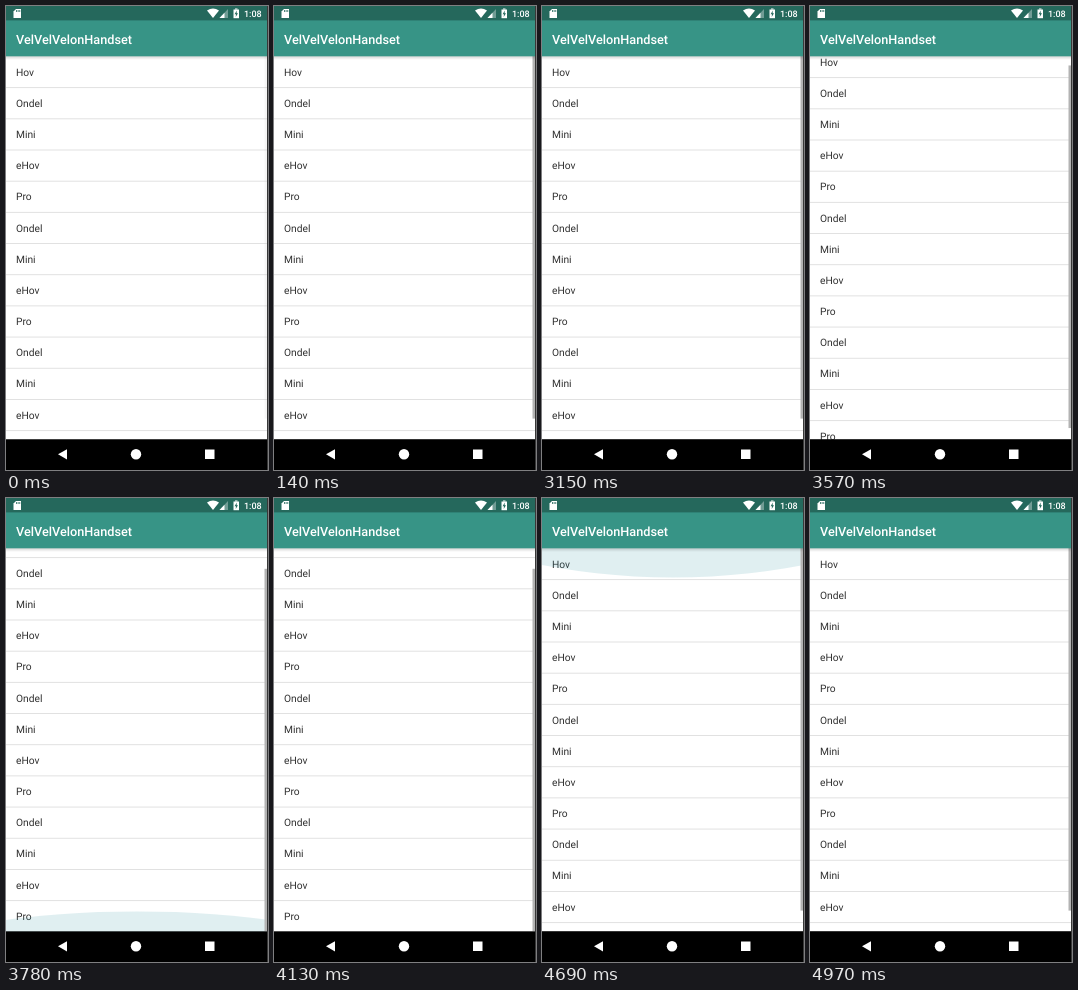
An HTML page with a canvas for the animation above (5.88 s loop, 262x464 px).

```html
<!DOCTYPE html>
<html lang="en">
<head>
<meta charset="utf-8">
<title>List overscroll</title>
<style>
  html, body { margin: 0; width: 100%; height: 100%; overflow: hidden; background: #fff; }
  canvas { display: block; width: 262px; height: 464px; }
</style>
</head>
<body>
<canvas id="stage" width="262" height="464"></canvas>
<script>
const ctx = document.getElementById('stage').getContext('2d');
ctx.textRendering = 'geometricPrecision';

const W = 262, H = 464, TOP = 50, BOTTOM = 433.4, VIEW = BOTTOM - TOP;
const LOOP = 5880, STEP = 70;
const ROW = 31.18, MAX_SCROLL = 22;
const FONT = 'Roboto, "Open Sans", sans-serif';
const CYCLE = ['Ondel', 'Mini', 'eHov', 'Pro'];
const ROWS = ['Hov', ...Array.from({ length: 12 }, (_, i) => CYCLE[i % 4])];

// Key points: [time in ms, value]
const SCROLL = [[3500, 0], [3570, 10], [3640, MAX_SCROLL], [4410, MAX_SCROLL], [4480, 0]];
const TOP_GLOW = [[2660, 0], [2730, 0.74], [2940, 0], [4480, 0], [4550, 0.3],
  [4620, 0.52], [4690, 0.56], [4970, 0]];
const BOTTOM_GLOW = [[3570, 0], [3640, 0.25], [3710, 0.55], [3780, 0.38], [3850, 0]];
const BAR_ALPHA = [[0, 0.12], [140, 0], [2660, 0], [2730, 1]];

function valueAt(keys, t) {
  if (t <= keys[0][0]) return keys[0][1];
  for (let i = 1; i < keys.length; i++) {
    const [t0, a] = keys[i - 1], [t1, b] = keys[i];
    if (t <= t1) return a + (b - a) * (t - t0) / (t1 - t0);
  }
  return keys[keys.length - 1][1];
}

function rect(x, y, w, h, color) {
  ctx.fillStyle = color;
  ctx.fillRect(x, y, w, h);
}

function poly(points, color) {
  ctx.fillStyle = color;
  ctx.beginPath();
  points.forEach(([x, y]) => ctx.lineTo(x, y));
  ctx.fill();
}

function disc(x, y, r, color) {
  ctx.fillStyle = color;
  ctx.beginPath();
  ctx.arc(x, y, r, 0, Math.PI * 2);
  ctx.fill();
}

function text(str, x, y, size, weight, color) {
  ctx.font = `${weight} ${size}px ${FONT}`;
  ctx.fillStyle = color;
  ctx.fillText(str, x, y);
}

// Vertically scaled circle segment hanging from a list edge
function glow(edge, dir, scale) {
  if (scale <= 0) return;
  const r = W * 1.5, height = r * (1 - Math.cos(Math.PI / 6));
  ctx.fillStyle = `rgba(50, 150, 160, ${0.15 * Math.min(1, scale * 2.7)})`;
  ctx.beginPath();
  ctx.ellipse(W / 2, edge + dir * scale * (height - r), r, r * scale, 0, 0, Math.PI * 2);
  ctx.fill();
}

function drawList(t) {
  const scroll = valueAt(SCROLL, t);
  rect(0, TOP, W, VIEW, '#fff');
  ROWS.forEach((label, i) => {
    const y = TOP + i * ROW - scroll;
    text(label, 10, y + 19.6, 10.25, 400, '#303030');
    rect(0, y + ROW, W, 0.9, '#dedede');
  });
  glow(TOP, 1, valueAt(TOP_GLOW, t));
  glow(BOTTOM, -1, valueAt(BOTTOM_GLOW, t));
  if (t >= 2730 && t < 2800) disc(127, 220.5, 14, 'rgba(0, 0, 0, 0.075)');

  const ratio = VIEW / (VIEW + MAX_SCROLL);
  ctx.globalAlpha = valueAt(BAR_ALPHA, t);
  rect(258.5, TOP + scroll * ratio, 2.5, VIEW * ratio, '#b3b3b3');
  ctx.globalAlpha = 1;

  const shade = ctx.createLinearGradient(0, TOP, 0, TOP + 4);
  shade.addColorStop(0, 'rgba(0, 0, 0, 0.17)');
  shade.addColorStop(1, 'rgba(0, 0, 0, 0)');
  rect(0, TOP, W, 4, shade);
}

function drawStatusIcons() {
  const white = '#fff', dark = '#25685c';
  // Memory card
  poly([[10, 3], [15, 3], [15, 12], [7.5, 12], [7.5, 5.5]], white);
  [10, 11.7, 13.4].forEach(x => rect(x, 4, 0.8, 2, dark));
  // Wireless fan
  ctx.fillStyle = white;
  ctx.beginPath();
  ctx.moveTo(207, 12);
  ctx.lineTo(201, 4.6);
  ctx.quadraticCurveTo(207, 0.6, 213, 4.6);
  ctx.fill();
  // Signal
  poly([[222, 3], [222, 12], [213.5, 12]], 'rgba(255, 255, 255, 0.35)');
  poly([[218.5, 6.7], [218.5, 12], [213.5, 12]], white);
  // Battery with bolt
  rect(227.5, 3.5, 5.5, 8.7, white);
  rect(229, 2.5, 2.5, 1, white);
  poly([[230.8, 4.5], [228.6, 8.2], [230, 8.2], [229.7, 11], [232, 7.2], [230.6, 7.2]], dark);
  text('1:08', 238, 11.2, 9, 500, white);
}

function drawHeader() {
  rect(0, 0, W, TOP + 0.3, '#379486');
  rect(0, 0, W, 14.4, '#25685c');
  drawStatusIcons();
  text('VelVelVelonHandset', 10, 37.5, 12.7, 500, '#fff');
}

function drawNavBar() {
  rect(0, BOTTOM, W, H - BOTTOM, '#000');
  poly([[52, 448.3], [61, 443.2], [61, 453.4]], '#fff');
  disc(130, 448.3, 5.2, '#fff');
  rect(199, 443.5, 9.5, 9.5, '#fff');
}

function frame(now) {
  const t = Math.floor((now % LOOP) / STEP) * STEP;
  drawList(t);
  drawHeader();
  drawNavBar();
  rect(W - 1, 0, 1, H, '#383838');
}

const start = performance.now();
function tick() {
  frame(performance.now() - start);
  requestAnimationFrame(tick);
}
tick();
</script>
</body>
</html>
```
